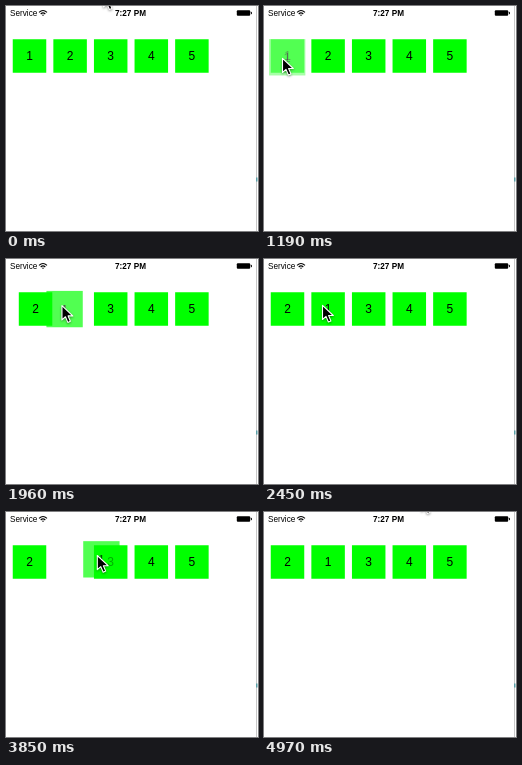
An HTML page that plays this animation: 252 px wide and 225 px high, repeating every 5110 ms.

```html
<!DOCTYPE html>
<html lang="en">
<head>
<meta charset="utf-8">
<title>Drag to reorder</title>
<style>
  html, body { margin: 0; width: 100%; height: 100%; overflow: hidden; background: #fff; }
  svg { display: block; width: 252px; height: 225px; }
  text { font-family: "Liberation Sans", Arial, sans-serif; font-size: 8.2px; }
  .tile text { font-size: 12px; text-anchor: middle; }
  .tile rect { fill: #0f0; }
  #cursor { filter: drop-shadow(0 1px 1px #0006); }
</style>
</head>
<body>
<svg viewBox="0 0 252 225">
  <text x="4" y="10">Service</text>
  <g fill="none" stroke="#000" stroke-width="1.1">
    <path d="M33 6.3Q37 2.7 41 6.3M34.7 8Q37 5.9 39.3 8"/>
    <path d="M36 8.9Q37 8.2 38 8.9L37 10Z" fill="#000" stroke="none"/>
  </g>
  <text x="124.5" y="10" text-anchor="middle" font-weight="bold">7:27 PM</text>
  <rect x="230.8" y="4.3" width="13.4" height="5.4" rx="1"/>
  <rect x="244.9" y="5.8" width="1" height="2.4" rx=".4"/>
  <rect x="250" width="1" height="225" fill="#c8c8c8"/>
  <rect x="250" y="171.5" width="1.5" height="4" fill="#5aa0a8"/>
  <g id="tiles"></g>
  <path id="cursor" d="M.5 .8V15L4 11.9L6.4 17.5L8.9 16.4L6.6 11H11.3Z"
        stroke="#fff" stroke-width="1.1" stroke-linejoin="round"/>
</svg>
<script>
const LOOP = 5110, STEP = 70, SIZE = 33.5, ROW_Y = 50;
const slot = i => [23.5 + 40.6 * i, ROW_Y];

const smooth = p => p * p * (3 - 2 * p);
const accelerate = p => smooth(p * p);
const settle = p => p ** .75;
const ramp = (t, start, end) => Math.min(1, Math.max(0, (t - start) / (end - start)));
const mix = (a, b, p) => a.map((v, i) => v + (b[i] - v) * p);

// Applies moves in turn: [start time, end time, destination, easing]
const follow = (t, origin, moves) => moves.reduce(
  (point, [start, end, to, easing = smooth]) => mix(point, to, easing(ramp(t, start, end))),
  origin);

const cursorMoves = [
  [0, 560, [18, 51.5]],
  [1190, 2100, [58, 45.5]],
  [3430, 4130, [169, 36], accelerate],
  [4480, 4760, [157, -16]]
];
const dragMoves = [
  [1190, 2100, [61, 50]],
  [2170, 2450, slot(1)],
  [3430, 4130, [170, 41], accelerate],
  [4130, 4410, slot(1), settle]
];

const cursor = document.getElementById("cursor");

function makeTile(label) {
  const group = document.createElementNS("http://www.w3.org/2000/svg", "g");
  group.setAttribute("class", "tile");
  group.innerHTML = `<rect x="${-SIZE / 2}" y="${-SIZE / 2}" width="${SIZE}" height="${SIZE}"/>` +
    `<text y="4.2">${label}</text>`;
  document.getElementById("tiles").append(group);
  return group;
}

function place(element, [x, y], scale = 1, opacity = 1) {
  element.setAttribute("transform", `translate(${x} ${y}) scale(${scale})`);
  element.setAttribute("opacity", opacity);
}

const cells = [1, 2, 3, 4, 5].map(makeTile);
const lifted = makeTile(1);
cells.forEach((cell, i) => place(cell, slot(i)));

function draw(t) {
  const pickUp = ramp(t, 1120, 1260);
  const release = ramp(t, 4130, 4410);
  const held = 1 - ramp(t, 2170, 2450) + ramp(t, 3360, 3500);
  const swap = smooth(ramp(t, 1680, 2050));

  place(cells[0], slot(release > 0 ? 1 : 0), 1, 1 - pickUp + release);
  place(cells[1], slot(1 - swap));
  place(lifted, follow(t, [23.2, 51.3], dragMoves), 1 + .085 * held,
    pickUp * (1 - .32 * held) * (1 - release) ** 2);
  place(cursor, follow(t, [97, -14], cursorMoves));
}

const start = performance.now();
function tick() {
  const t = (performance.now() - start) % LOOP;
  draw(Math.floor(t / STEP) * STEP);
  requestAnimationFrame(tick);
}
tick();
</script>
</body>
</html>
```
